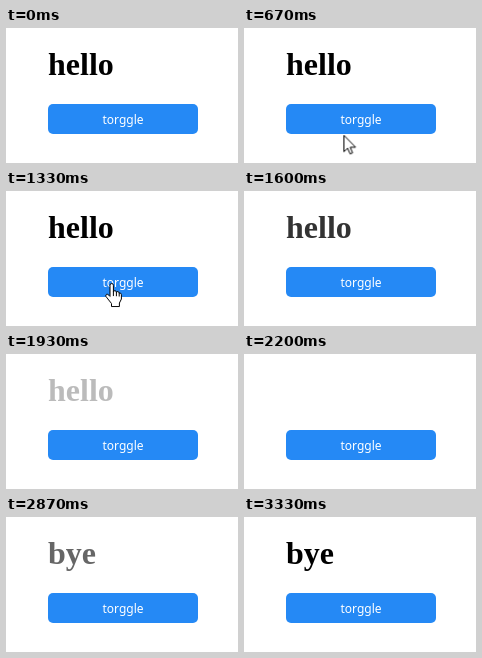
An HTML page for the animation above (3.39 s loop, 232 px wide and 135 px high).

```html
<!DOCTYPE html>
<html lang="en">
<head>
<meta charset="utf-8">
<title>Toggle fade</title>
<style>
  html, body { margin: 0; width: 100%; height: 100%; overflow: hidden; background: #fff; }
  svg { display: block; }
  .title { font: bold 32px "Liberation Serif", serif; }
  .label { font: 12px "Noto Sans", "Open Sans", sans-serif; fill: #fff; text-anchor: middle; }
  .cursor path { fill: #fff; stroke: #000; stroke-linejoin: round; stroke-linecap: round; }

  .title, .label, .cursor, .hand, .arrow {
    animation: 3390ms linear infinite paused;
  }
  .hello  { animation-name: fade-out, hide; }
  .bye    { animation-name: fade-in, show; }
  .label  { animation-name: press; }
  .cursor { animation-name: travel; }
  .hand   { animation-name: over; }
  .arrow  { animation-name: outside; }

  @keyframes fade-out {
    0% { opacity: 1; }
    38.05% { opacity: 1; animation-timing-function: ease-in-out; }
    67.55%, 100% { opacity: 0; }
  }
  @keyframes hide {
    0%, 64.7% { visibility: visible; }
    64.71%, 100% { visibility: hidden; }
  }
  @keyframes fade-in {
    0% { opacity: 0; }
    68.14% { opacity: 0; animation-timing-function: ease-in-out; }
    97.64%, 100% { opacity: 1; }
  }
  @keyframes show {
    0%, 74.6% { visibility: hidden; }
    74.65%, 100% { visibility: visible; }
  }
  @keyframes press {
    0%, 33.3% { transform: none; }
    33.4%, 37.3% { transform: translateX(1px); }
    37.4%, 100% { transform: none; }
  }
  @keyframes travel {
    0%, 17.6% { transform: translate(93px, 150px); }
    17.69% { transform: translate(93px, 122px); animation-timing-function: ease-out; }
    23.55% { transform: translate(106px, 92px); }
    39.2% { transform: translate(106px, 92px); animation-timing-function: ease-in; }
    46.9% { transform: translate(102px, 138px); }
    47%, 100% { transform: translate(93px, 150px); }
  }
  @keyframes over {
    0%, 20.6% { visibility: hidden; }
    20.7%, 43.8% { visibility: visible; }
    43.9%, 100% { visibility: hidden; }
  }
  @keyframes outside {
    0%, 20.6% { visibility: visible; }
    20.7%, 43.8% { visibility: hidden; }
    43.9%, 100% { visibility: visible; }
  }
</style>
</head>
<body>
<svg width="232" height="135" viewBox="0 0 232 135">
  <text class="title hello" x="42" y="47">hello</text>
  <text class="title bye" x="42" y="47">bye</text>
  <rect x="42" y="76" width="150" height="30" rx="5" fill="#2589f5"/>
  <text class="label" x="117" y="96">torggle</text>
  <g class="cursor">
    <g class="hand" transform="translate(-7 0)">
      <path d="M5 13V2.2a1.7 1.7 0 0 1 3.4 0V8.6q.5-1 1.7-.9t1.3 1.5q.5-.9 1.6-.6t1.2 1.5q1.8-.6 2.2 1.4V16l-2 4v3.5H6.5V20.5L1 13.5q-.8-1.8 .8-2.3 1-.2 1.9 .8z"/>
      <path d="M8.4 8.6v4M11.4 9.2v3.6M14.2 10.1v3"/>
    </g>
    <path class="arrow" d="M.5 .5V16.5L4.2 13L6.7 18.7L9.2 17.6L6.8 12H11.8z"/>
  </g>
</svg>
<script>
  // Hold the motion on a 15 fps grid, as in a screen recording.
  const loop = 3390, step = 1000 / 15, slack = 4;
  const parts = document.getAnimations();
  const start = performance.now();

  function draw() {
    const t = (performance.now() - start) % loop;
    const held = Math.floor((t + slack) / step) * step;
    for (const part of parts) part.currentTime = held;
    requestAnimationFrame(draw);
  }
  draw();
</script>
</body>
</html>
```
